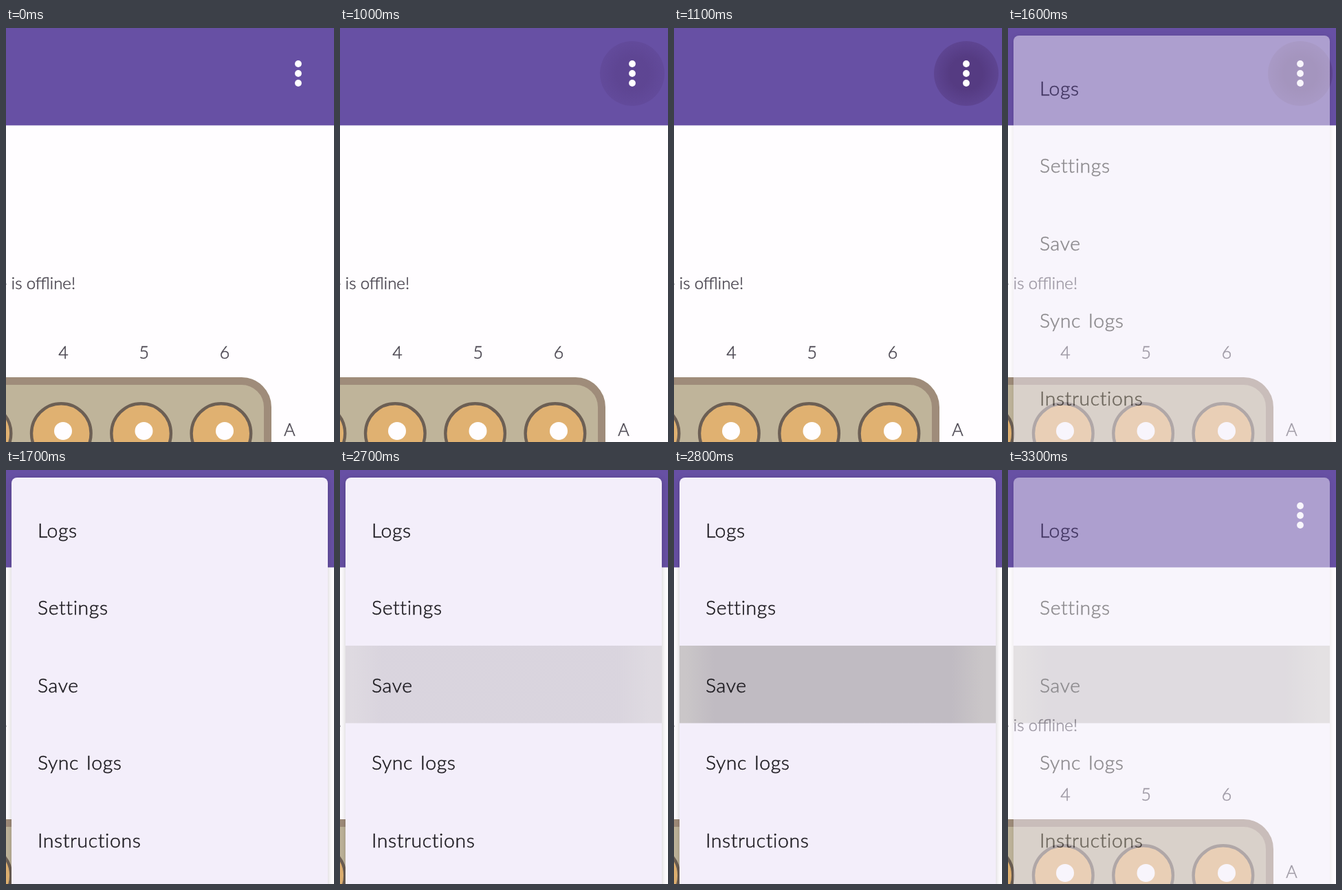
Animation of 477x601 px, one loop 3.4 s. Source, as an HTML page:

```html
<!DOCTYPE html>
<html lang="en">
<head>
<meta charset="utf-8">
<title>Overflow menu</title>
<style>
  html, body { margin: 0; width: 100%; height: 100%; overflow: hidden; background: #fffdff; }
  svg { display: block; width: 477px; height: 601px; }
  text { font-family: Lato, "Open Sans", sans-serif; font-weight: 300; stroke-width: .5px; }
  .label, .message { fill: #49454f; stroke: #49454f; }
  .label { font-size: 25px; text-anchor: middle; }
  .message { font-size: 24px; text-anchor: end; }
  .item { font-size: 28.4px; letter-spacing: .6px; word-spacing: 3px; fill: #1d1b20; stroke: #1d1b20; }
  #panel { filter: drop-shadow(0 2px 4px rgba(0, 0, 0, .2)); }
</style>
</head>
<body>
<svg viewBox="0 0 477 601">
  <defs>
    <radialGradient id="rippleShade">
      <stop offset=".5" stop-color="#553b82"/>
      <stop offset="1" stop-color="#5e4592"/>
    </radialGradient>
    <linearGradient id="pressShade">
      <stop offset=".02" stop-color="#cac6c8"/>
      <stop offset=".11" stop-color="#c0bbc2"/>
      <stop offset=".86" stop-color="#c0bbc2"/>
      <stop offset=".96" stop-color="#cac6c8"/>
    </linearGradient>
  </defs>

  <rect width="477" height="141.4" fill="#6750a4"/>
  <circle id="ripple" cx="425" cy="66" r="47" fill="url(#rippleShade)"/>
  <g id="dots" fill="#fff"></g>

  <text class="message" x="101" y="379">The device is offline!</text>
  <rect x="-400" y="512.5" width="780.5" height="300" rx="38" fill="#bfb49a" stroke="#9f8c7a" stroke-width="11"/>
  <g id="board"></g>
  <text class="label" x="412.5" y="591.5">A</text>

  <g id="menu">
    <rect id="panel" x="8" y="11" width="460" height="640" rx="8" fill="#f3eefa"/>
    <rect id="press" x="8" y="255" width="460" height="112.5" fill="url(#pressShade)"/>
    <g id="items"></g>
  </g>
</svg>
<script>
  const byId = id => document.getElementById(id);

  function add(parent, tag, attributes, content = '') {
    const node = document.createElementNS('http://www.w3.org/2000/svg', tag);
    for (const [name, value] of Object.entries(attributes)) node.setAttribute(name, value);
    node.textContent = content;
    byId(parent).append(node);
  }

  for (const cy of [52, 66, 80]) add('dots', 'circle', { cx: 425, cy, r: 4.9 });

  for (let column = 3; column <= 6; column++) {
    const step = column - 4;
    add('board', 'circle', {
      cx: 80.3 + 116.3 * step, cy: 588.5, r: 43.3,
      fill: '#e0b171', stroke: '#6c5f54', 'stroke-width': 4.4
    });
    add('board', 'circle', { cx: 83 + 117.5 * step, cy: 585, r: 13, fill: '#fffdff' });
    add('board', 'text', { class: 'label', x: 83.5 + 117.3 * step, y: 479.5 }, column);
  }

  ['Logs', 'Settings', 'Save', 'Sync logs', 'Instructions'].forEach((name, row) =>
    add('items', 'text', { class: 'item', x: 46, y: 97.5 + 112.6 * row }, name));

  // Each row: start time in ms, then opacity of ripple, menu and pressed item.
  const states = [
    [0, 0, 0, 0],
    [1000, .5, 0, 0],
    [1100, 1, 0, 0],
    [1600, 1, .5, 0],
    [1700, 0, 1, 0],
    [2700, 0, 1, .5],
    [2800, 0, 1, 1],
    [3300, 0, .5, 1]
  ];
  const LOOP = 3400;
  const layers = ['ripple', 'menu', 'press'].map(byId);
  const start = performance.now();

  function draw(now) {
    const time = Math.max(0, now - start) % LOOP;
    const [, ...opacities] = states.findLast(([from]) => from <= time);
    layers.forEach((layer, i) => layer.setAttribute('opacity', opacities[i]));
    requestAnimationFrame(draw);
  }
  draw(start);
</script>
</body>
</html>
```
